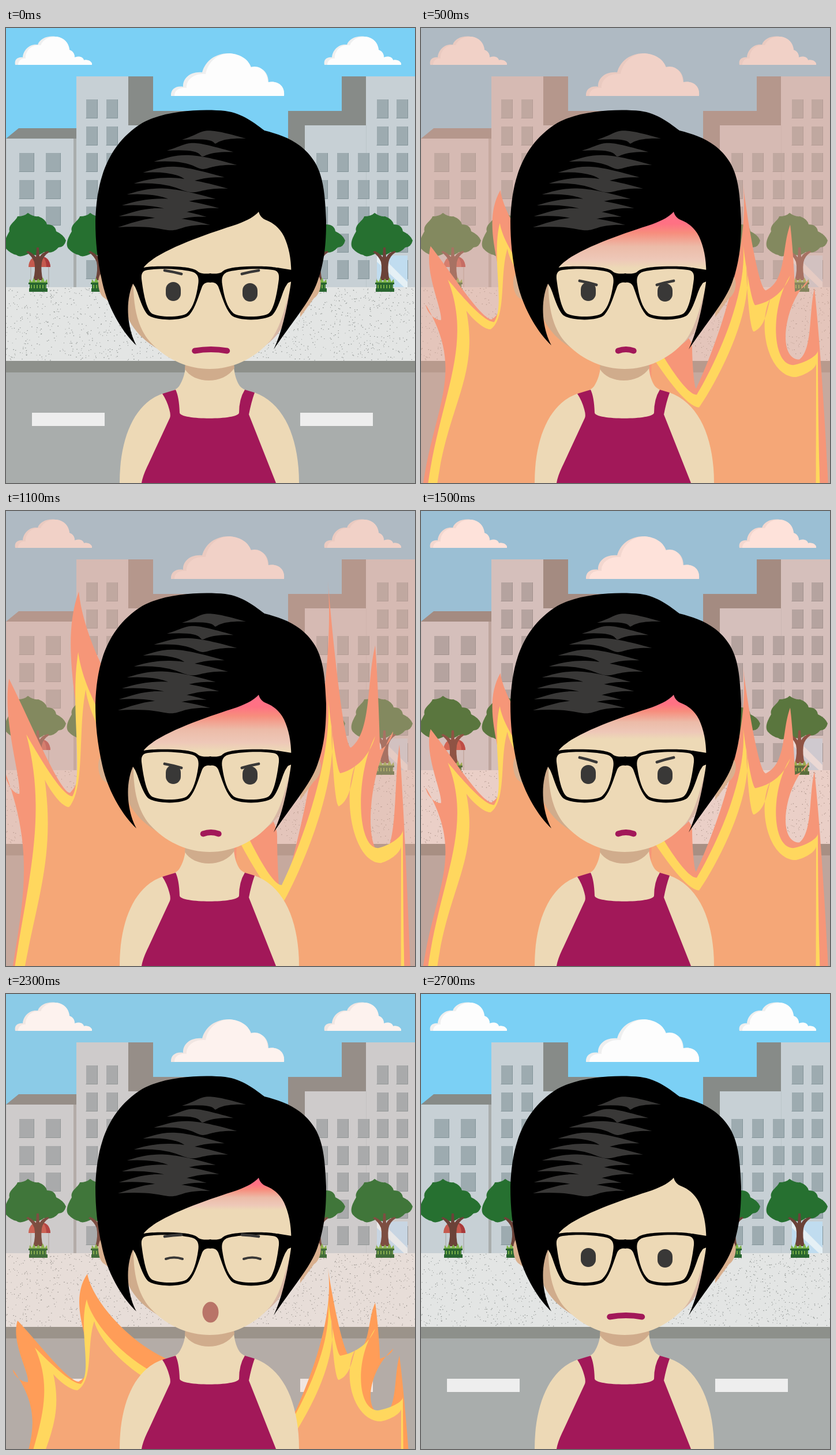
Recreate the animation shown at these times as an HTML page. Size 709 by 790 pixels, loop 3200 ms.

```html
<!DOCTYPE html>
<html lang="en">
<head>
<meta charset="utf-8">
<title>Cooling down</title>
<style>
html, body { margin: 0; width: 100%; height: 100%; overflow: hidden; background: #7bd0f5; }
svg { display: block; width: 100%; height: 100%; }
</style>
</head>
<body>
<svg viewBox="0 0 709 790" preserveAspectRatio="none">
  <defs>
    <linearGradient id="heatFill" x1="0" y1="0" x2="0" y2="1">
      <stop offset=".02" stop-color="#ff7089"/>
      <stop offset=".22" stop-color="#ff7183"/>
      <stop offset=".38" stop-color="#f78d7d"/>
      <stop offset=".62" stop-color="#ecbba8"/>
      <stop offset=".85" stop-color="#eec8b8"/>
      <stop offset="1" stop-color="#edd9b6"/>
    </linearGradient>
    <g id="cloud">
      <path fill="#efefef" d="M16 64C14 55 20 50 29 51C30 38 41 27 55 29C59 18 72 13 86 15C99 16 109 25 110 38C116 40 119 45 119 51C128 48 134 51 135 56C143 54 150 59 149 64Z"/>
      <path fill="#fdfdfd" d="M21 64C21 57 27 52 34 53C33 39 45 28 60 30C65 19 75 14 88 15C101 17 109 26 110 38C116 40 119 45 119 51C128 48 134 51 135 56C143 54 150 59 149 64Z"/>
    </g>
    <g id="tree">
      <path fill="#267030" d="M0 383C-6 374 1 362 6 353C3 341 17 336 20 327Q32 327 38 321Q47 328 56 327Q69 332 71 341Q85 341 87 353Q100 359 104 369Q101 381 91 381Q81 393 66 389Q53 399 41 391Q24 400 18 394Q8 392 0 383Z"/>
      <path fill="#6b4238" d="M47 438Q52 420 49 406Q45 396 35 389L38 387Q48 392 52 398L53 381H57L58 398Q63 389 73 387L75 389Q64 396 62 407Q60 422 64 438Z"/>
      <path fill="#7cb347" d="M40 444L41 436L45 441L48 434L52 441L56 435L60 441L64 433L67 441L71 436L72 444Z"/>
      <path fill="#28652f" d="M39 442H72V445H70V452H72V458H40V452H41V445H39Z"/>
      <path stroke="#76ad46" stroke-width="6" stroke-dasharray="2 3" d="M43 449H69"/>
    </g>
    <path id="frame" fill-rule="evenodd" d="M229 420C235 414 262 413 290 414C315 415 329 418 334 424C340 427 347 427 355 426V442C347 441 343 443 340 449C334 464 329 485 318 498C308 509 262 509 247 499C236 489 230 462 224 450L219 442ZM246 420C237 421 234 426 235 436C238 460 243 487 252 495C262 503 304 503 314 495C325 485 330 466 333 446C335 434 333 426 322 423C300 418 268 417 246 420Z"/>
  </defs>

  <rect width="709" height="451" fill="#7bd0f5"/>
  <use href="#cloud"/>
  <use href="#cloud" x="536"/>
  <path fill="#efefef" d="M286 118C285 106 295 100 307 102C306 87 320 75 340 77C346 55 366 43 388 44C408 46 423 58 426 71C441 64 455 76 455 94C472 91 484 101 482 118Z"/>
  <path fill="#fdfdfd" d="M292 118C292 108 300 103 313 104C312 90 326 78 346 80C350 58 368 44 388 44C408 46 421 55 424 68C441 63 453 76 454 94C472 91 484 101 482 118Z"/>

  <path fill="#878b88" d="M0 192L22 174H122V192ZM212 84H255V144H340V170H212ZM582 84H624V170H518V450H489V144H582Z"/>
  <path fill="#c7d0d5" d="M0 192H117V450H0ZM122 84H212V169H340V450H122ZM518 169H624V84H709V450H518Z"/>
  <path fill="#a9adad" d="M117 192H122V450H117Z"/>
  <path stroke="#bcc6ca" d="M.5 192V450M624.5 169V450" fill="none"/>
  <g id="windows"></g>
  <path fill="#c0dcef" d="M643 395H696V450H643Z"/>
  <path fill="#e5f0f5" d="M643 395H650L696 441V450H690L643 406Z"/>
  <path stroke="#b5b8b8" stroke-width="2" fill="none" d="M43 413V450M74 413V450"/>
  <path fill="#c55a4e" d="M39 415Q40 396 58 396Q76 396 77 415Z"/>
  <path fill="#a9393b" d="M64 397Q76 400 77 415H70Q70 404 64 397Z"/>

  <rect y="450" width="709" height="129" fill="#e3e5e4"/>
  <path id="specks" fill="none" stroke="#8d9290" stroke-width="1.2"/>
  <use href="#tree"/><use href="#tree" x="108"/><use href="#tree" x="484"/><use href="#tree" x="601"/>
  <rect y="578" width="709" height="21" fill="#8d908b"/>
  <rect y="598" width="709" height="192" fill="#a9adac"/>
  <path fill="#eee" d="M45 668H171V691H45ZM510 668H636V691H510Z"/>
  <rect id="tint" width="709" height="790"/>

  <g id="fire"></g>

  <path fill="#d9b08f" d="M170 424C157 424 157 456 168 467Q178 474 185 480V430ZM538 428C551 434 546 462 534 469L510 502V440Z"/>
  <path fill="#edd9b6" d="M312 575C312 598 306 613 300 622C294 630 282 632 271 635C222 652 197 713 197 790H508C508 713 483 652 431 633C420 631 408 628 403 618C398 608 395 598 394 575Z"/>
  <path fill="#d0ac8c" d="M311 580L310 592C325 618 377 620 396 590L394 575Z"/>
  <path fill="#a21859" d="M271 635L294 628Q300 640 301 668C302 681 403 681 404 668Q404 644 414 628L431 633Q425 650 421 671L468 790H235Q237 777 247 757L284 677Q286 672 283 662Q279 647 271 635Z"/>
  <path fill="#d0ac8c" d="M206 430H300V572C262 562 226 537 211 502Z"/>
  <path fill="#d8b7a5" d="M500 430H400V572C450 562 484 530 494 480Z"/>
  <path fill="#edd9b6" d="M221 420C219 475 225 515 248 543C276 575 315 592 353 592C392 592 430 575 458 543C476 520 484 485 496 440V310H221Z"/>
  <rect id="heat" x="225" y="318" width="275" fill="url(#heatFill)"/>

  <path d="M226 551C200 527 176 483 167 442C158 402 155 370 155 335C157 262 177 202 236 165C275 143 340 140 380 144C410 148 432 166 448 178C480 186 514 198 536 234C551 260 553 292 555 335C555 375 552 407 540 440C528 474 502 502 464 558C478 528 487 490 494 442C496 405 491 382 482 362C474 346 462 338 452 334C444 331 440 326 438 319C430 328 420 333 400 341C350 357 264 386 240 414L222 440C206 470 209 520 226 551Z"/>
  <path id="shine" fill="#393837"/>

  <use href="#frame"/>
  <use href="#frame" transform="translate(708) scale(-1 1)"/>
  <path d="M470 416L495 420V440Q484 443 480 452Z"/>
  <g fill="none" stroke="#393837" stroke-linecap="round">
    <path id="brows" stroke-width="4.8"/>
    <path id="closed" stroke-width="4" d="M277 460Q291 455 306 460M412 460Q427 455 441 460"/>
  </g>
  <g id="open" fill="#393837">
    <rect x="277" y="441" width="26" height="33" rx="13"/>
    <rect x="410" y="443" width="26" height="32" rx="13"/>
  </g>
  <path id="lips" fill="none" stroke="#a21859" stroke-width="10" stroke-linecap="round"/>
  <ellipse id="blow" cx="354.5" cy="552.5" rx="14" ry="18" fill="#b97468"/>
</svg>
<script>
const $ = id => document.getElementById(id);
const set = (id, attr, value) => $(id).setAttribute(attr, value);
const show = (id, on) => set(id, 'visibility', on ? 'visible' : 'hidden');

function drawWindows() {
  let html = '';
  const column = (x, w, from, to) => {
    for (let floor = from; floor <= to; floor++) {
      const y = Math.round(124 + floor * 46.5);
      html += `<path fill="#9dabb0" d="M${x} ${y}h${w}v33h${-w}z"/>` +
        `<path fill="none" stroke="#84959a" d="M${x + w - .5} ${y}v32.5h${-w}"/>`;
    }
  };
  for (const x of [23, 69]) column(x, 26, 2, 4);
  for (const x of [139, 174, 643, 677]) column(x, 20, 0, 6);
  for (const x of [538, 574, 610]) column(x, 20, 2, 6);
  $('windows').innerHTML = html;
}

function drawSpecks() {
  let seed = 7, d = '';
  const rnd = () => (seed = seed * 16807 % 2147483647) / 2147483647;
  for (let i = 0; i < 1500; i++) d += `M${(rnd() * 709).toFixed(1)} ${(451 + rnd() * 126).toFixed(1)}h${(.6 + rnd()).toFixed(1)}`;
  set('specks', 'd', d);
}

// Overlapping tapered strands that fan out at both ends
function drawShine() {
  const count = 9;
  let d = '';
  for (let i = 0; i < count; i++) {
    const u = i / (count - 1);
    const lx = 194 + 111 * (1 - u) ** 2, ly = 194 + 152 * u;
    const rx = 416 - 62 * u - (i % 2) * 14, ry = 192 + 150 * u + 12 * Math.sin(u * Math.PI);
    d += `M${lx} ${ly}C${lx + 45} ${ly - 14} ${rx - 85} ${ry - 24} ${rx} ${ry}` +
      `C${rx - 55} ${ry - 2} ${rx - 50} ${ry + 14} ${(lx + rx) / 2} ${(ly + ry) / 2 + 6}Q${lx + 50} ${ly - 3} ${lx} ${ly}Z`;
  }
  set('shine', 'd', d);
}

// Each tongue: tip x, y, curl going up, bend going down, next valley x, y.
// "pull" and "rise" say how strongly a layer follows the stretch and lift.
const layers = [
  { fill: 'outer', start: 0, swell: 78, pull: 1, rise: 1, tongues: [
    [12, 584, 0, 0, 38, 606], [20, 499, 12, 35, 126, 605], [141, 418, 45, 10, 340, 580],
    [470, 645, 0, 0, 477, 705], [558, 408, -15, 8, 598, 563], [640, 468, 15, 5, 648, 565],
    [671, 548, 0, -45, 656, 663], [682, 560, 10, 15, 708, 900]] },
  { fill: '#ffd75e', start: 10, swell: 50, pull: .85, rise: 1, tongues: [
    [50, 546, 0, 22, 130, 609], [140, 462, 15, 10, 330, 610]] },
  { fill: '#f5a777', start: 26, swell: 25, pull: .85, rise: 1, tongues: [
    [82, 592, 0, 8, 124, 620], [153, 500, 14, 10, 330, 628]] },
  { fill: '#ffd75e', start: 390, swell: 0, pull: .5, rise: .75, tongues: [
    [400, 610, 0, 20, 478, 702], [557, 455, -15, 5, 580, 560], [640, 513, 6, -35, 645, 655],
    [688, 632, 0, 0, 695, 900]] },
  { fill: '#f5a777', start: 390, swell: 0, pull: .5, rise: .75, tongues: [
    [400, 640, 0, 20, 482, 722], [564, 495, -15, 0, 577, 602], [606, 548, 6, -25, 650, 674],
    [685, 652, 0, 0, 684, 900]] }
];

function flamePath({ start, swell, pull, rise, tongues }, stretch, lift) {
  const base = 600, k = stretch ** pull;
  const mapY = y => base + (y - base) * k - lift * rise;
  const mapX = x => x < 300 ? x - 17 * (stretch - 1) : x;
  let vx = mapX(start), vy = mapY(900);
  let d = `M${vx} ${vy}`;
  tongues.forEach(([x, y, curl, bend, nextX, nextY], i) => {
    const tx = mapX(x), ty = mapY(y), h = vy - ty;
    d += i
      ? `C${(vx + tx) / 2 + curl} ${vy - .15 * h} ${tx - curl} ${ty + .35 * h} ${tx} ${ty}`
      : `C${vx + 10} ${mapY(740)} ${tx + swell} ${mapY(y + 110)} ${tx} ${ty}`;
    vx = mapX(nextX);
    vy = mapY(nextY);
    d += `C${tx + bend} ${ty + .35 * (vy - ty)} ${(tx + vx) / 2 + bend} ${vy} ${vx} ${vy}`;
  });
  return d + `V900H${start}Z`;
}

function drawFire(beat, colour) {
  const power = Math.min(1, Math.max(0, (7 - beat) / 2));
  const gust = beat > 0 && beat < 5 ? (beat % 2 ? 1 : .5) : 0;
  const sink = 34 * Math.max(0, beat - 7);
  const stretch = 1 + .2 * power + .67 * gust, lift = 100 * power + 20 * gust;
  set('fire', 'transform', `translate(0 ${sink})`);
  $('fire').innerHTML = layers.map(layer =>
    `<path fill="${layer.fill === 'outer' ? colour : layer.fill}" d="${flamePath(layer, stretch, lift)}"/>`).join('');
}

// Brow heights (outer, inner), eyes shut, mouth half width (0 = blowing)
const faces = {
  rest: { mouth: 28 },
  start: { brow: [421, 427], mouth: 28 },
  cross: { brow: [430, 437], mouth: 21 },
  angry: { brow: [439, 446], mouth: 13.5 },
  easing: { brow: [428, 436], mouth: 13.5 },
  shut: { brow: [421, 418], shut: true, mouth: 13.5 },
  blow: { brow: [421, 418], shut: true, mouth: 0 }
};

function drawFace({ brow, shut, mouth }) {
  show('brows', brow);
  if (brow) {
    const [a, b] = brow, m = (a + b) / 2 - .8;
    set('brows', 'd', `M275 ${a}Q290 ${m} 304 ${b}M438 ${a}Q423 ${m} 409 ${b}`);
  }
  show('open', !shut);
  show('closed', shut);
  show('lips', mouth);
  show('blow', !mouth);
  set('lips', 'd', `M${355.2 - mouth} 560.5Q355.2 555.5 ${355.2 + mouth} 560.5`);
}

// Moods during the blaze, by the beat on which each ends
const moods = [
  { until: 5, face: faces.angry, tint: 'rgba(228,163,144,.49)', flame: '#f69678' },
  { until: 7, face: faces.easing, tint: 'rgba(252,138,104,.24)', flame: '#f69678' },
  { until: 9, face: faces.shut, tint: 'rgba(255,150,118,.16)', flame: '#f5a777' },
  { until: 11, face: faces.blow, tint: 'rgba(255,160,130,.12)', flame: '#ff9d58' }
];
const LOOP = 3200, BEAT = 200, BLAZE = 500, CALM = 2700;

function calmFace(t) {
  if (t >= CALM) return faces.rest;
  return t < 200 ? faces.start : t < 300 ? faces.cross : faces.angry;
}

function render(t) {
  const burning = t >= BLAZE && t < CALM;
  show('fire', burning);
  show('tint', burning);
  show('heat', burning);
  if (!burning) return drawFace(calmFace(t));
  const beat = Math.floor((t - BLAZE) / BEAT);
  const mood = moods.find(m => beat < m.until);
  drawFace(mood.face);
  drawFire(beat, mood.flame);
  set('tint', 'fill', mood.tint);
  set('heat', 'height', beat < 5 ? 99 : 78 - 10.5 * Math.max(0, beat - 7));
}

let shown = -1;
function tick() {
  const t = Math.floor(performance.now() % LOOP / 100) * 100;
  if (t !== shown) render(shown = t);
  requestAnimationFrame(tick);
}

drawWindows();
drawSpecks();
drawShine();
tick();
</script>
</body>
</html>
```
